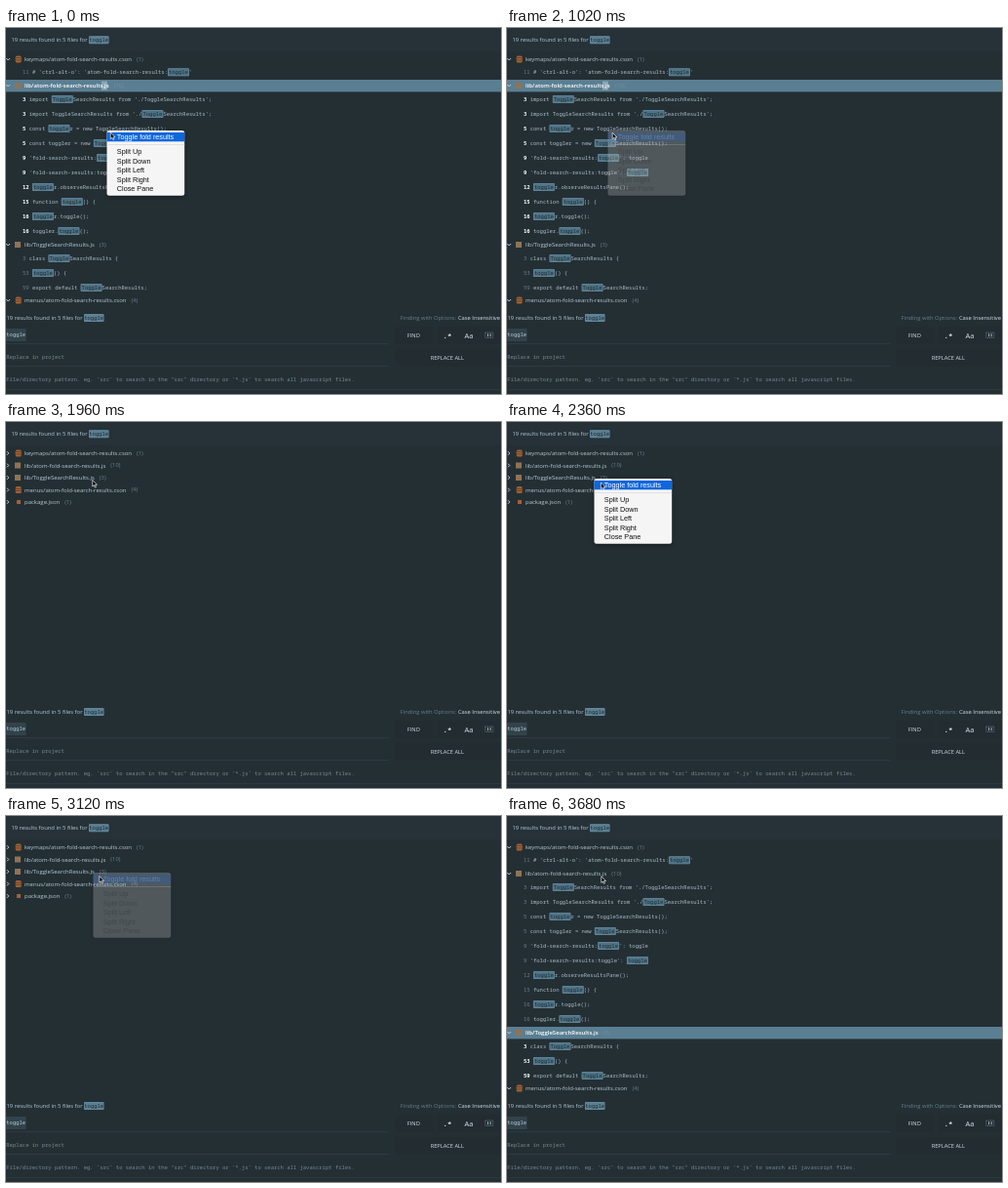
These frames come from a looping animation (508x375 px, 3.7 s). An HTML page with a canvas:

```html
<!DOCTYPE html>
<html lang="en">
<head>
<meta charset="utf-8">
<title>Fold search results</title>
<style>
  html, body { margin: 0; width: 100%; height: 100%; overflow: hidden; background: #242f34; }
  canvas { display: block; }
</style>
</head>
<body>
<canvas id="stage" width="508" height="375"></canvas>
<script>
const ctx = document.getElementById('stage').getContext('2d');
const LOOP = 3700;
const UI = '"Open Sans", sans-serif';
const MONO = '"Noto Sans Mono", monospace';
const MENU = '"Liberation Sans", sans-serif';
const C = {
  header: '#263238', list: '#242f34', button: '#222c31', line: '#2c3a41',
  name: '#b2cad6', code: '#a9bcc6', dim: '#66808c', hint: '#738a95', bright: '#d3e0e6',
  accent: '#5b7f92', mark: '#4f7385', markEdge: '#6b92a6', markText: '#1d2a30',
  orange: '#a8602f', tan: '#8f7355', blue: '#0f67dc'
};

// Square brackets enclose the highlighted match.
const files = [
  { name: 'keymaps/atom-fold-search-results.cson', count: 1, icon: 'stack', lines: [
    "11 # 'ctrl-alt-o': 'atom-fold-search-results:[toggle]'"] },
  { name: 'lib/atom-fold-search-results.js', count: 10, icon: 'square', lines: [
    "3 import [Toggle]SearchResults from './ToggleSearchResults';",
    "3 import ToggleSearchResults from './[Toggle]SearchResults';",
    '5 const [toggle]r = new ToggleSearchResults();',
    '5 const toggler = new [Toggle]SearchResults();',
    "9 'fold-search-results:[toggle]': toggle",
    "9 'fold-search-results:toggle': [toggle]",
    '12 [toggle]r.observeResultsPane();',
    '15 function [toggle]() {',
    '16 [toggle]r.toggle();',
    '16 toggler.[toggle]();'] },
  { name: 'lib/ToggleSearchResults.js', count: 3, icon: 'square', lines: [
    '3 class [Toggle]SearchResults {',
    '53 [toggle]() {',
    '59 export default [Toggle]SearchResults;'] },
  { name: 'menus/atom-fold-search-results.cson', count: 4, icon: 'stack', lines: [] },
  { name: 'package.json', count: 1, icon: 'dot', lines: [] }
];
const openY = [32, 59, 222, 279];
const menuItems = ['Split Up', 'Split Down', 'Split Left', 'Split Right', 'Close Pane'];

// Time, x, y of the pointer tip.
const pointerPath = [
  [0, 107.3, 107], [500, 107.3, 107], [700, 108.2, 107.2], [1480, 108.2, 107.2],
  [1880, 88.8, 59.5], [2140, 88.8, 59.5], [2340, 96.4, 62], [2960, 96.4, 62],
  [3240, 95.5, 61.3], [3420, 95.5, 61.3], [3600, 96.8, 61.8], [LOOP, 96.8, 61.8]
];
const menus = [
  { x: 103.5, y: 105, open: -1, hover: -1, blink: 740, fade: 880, close: 1060 },
  { x: 89.5, y: 58, open: 2060, hover: 2240, blink: 2840, fade: 2980, close: 3160 }
];
const FOLD_AT = 1140, UNFOLD_AT = 3500;

function rect(x, y, w, h, color) {
  ctx.fillStyle = color;
  ctx.fillRect(x, y, w, h);
}

function round(x, y, w, h, r, color) {
  ctx.beginPath();
  ctx.roundRect(x, y, w, h, r);
  ctx.fillStyle = color;
  ctx.fill();
}

function stroke(points, color, width = 1) {
  ctx.beginPath();
  points.forEach(([x, y]) => ctx.lineTo(x, y));
  ctx.strokeStyle = color;
  ctx.lineWidth = width;
  ctx.stroke();
}

// Draws text centred vertically on y and returns its right edge.
function text(str, x, y, size, family, color, style = '', align = 'left') {
  ctx.font = `${style} ${size}px ${family}`;
  ctx.textAlign = align;
  ctx.fillStyle = color;
  ctx.fillText(str, x, y + size * 0.34);
  return x + ctx.measureText(str).width;
}

const mono = (str, x, y, color, style) => text(str, x, y, 5.53, MONO, color, style);

function match(str, x, y) {
  round(x, y - 4, 22, 8, 1, C.markEdge);
  round(x + .5, y - 3.5, 21, 7, .7, C.mark);
  mono(str, x + 1, y, C.markText);
  return x + 22;
}

function badge(x, y) {
  round(x, y - 4, 20.5, 8, 1, C.markEdge);
  round(x + .5, y - 3.5, 19.5, 7, .7, C.accent);
  mono('toggle', x + .3, y, C.markText);
}

function codeLine(line, y, selected) {
  const gap = line.indexOf(' ');
  const number = line.slice(0, gap);
  mono(number, 17, y, selected ? '#fff' : C.dim, selected ? 'bold' : '');
  let x = 17 + (gap + 1) * 3.32;
  line.slice(gap + 1).split(/[[\]]/).forEach((part, i) => {
    x = i === 1 ? match(part, x, y) : mono(part, x, y, C.code);
  });
}

function icon(kind, y) {
  if (kind === 'stack') {
    round(9.7, y - 3.4, 6, 7, 1.6, C.orange);
    [-1.6, .7].forEach(dy => rect(9.7, y + dy, 6, .5, C.list));
  } else if (kind === 'square') {
    rect(9, y - 3, 6, 6, C.tan);
  } else {
    rect(11, y - 2, 4, 4, C.orange);
  }
}

function fileRow(file, y, open, selected, textSelected) {
  if (selected) rect(0, y - 6, 508, 12.4, C.accent);
  const arrow = open ? [[.3, y - 1], [2.2, y + 1], [4.1, y - 1]]
                     : [[1, y - 1.8], [2.8, y], [1, y + 1.8]];
  stroke(arrow, C.name);
  icon(file.icon, y);
  if (textSelected) rect(98, y - 4.5, 6, 9, '#8ba7b5');
  const end = text(file.name, 19, y, 6, UI, selected ? '#fff' : C.name, selected ? '600' : '500');
  text(`(${file.count})`, end + 5, y, 5.8, UI, selected ? '#6d8fa0' : C.dim);
}

function results(t) {
  rect(0, 24, 508, 262, C.list);
  if (t >= FOLD_AT && t < UNFOLD_AT) {
    files.forEach((file, i) => fileRow(file, 32 + i * 12.5, false));
    return;
  }
  const selected = t < FOLD_AT ? 1 : 2;
  openY.forEach((y, i) => {
    const first = [45.3, 73, 236, 0][i];
    fileRow(files[i], y, true, i === selected, i === 1 && selected === 1);
    files[i].lines.forEach((line, n) => codeLine(line, first + n * 15, i === selected));
  });
}

function summary(x, y) {
  text('19 results found in 5 files for', x, y, 5.88, UI, C.name, '500');
  badge(x + 79.5, y);
}

function findPanel() {
  rect(0, 286, 508, 89, C.list);
  summary(.5, 297);
  text('Finding with Options:', 462, 297, 5.8, UI, C.dim, '', 'right');
  text('Case Insensitive', 507, 297, 5.8, UI, C.bright, '500', 'right');

  rect(0, 308, 20.5, 13, '#33434b');
  mono('toggle', .3, 314.3, C.name);
  mono('Replace in project', .3, 337.3, C.hint);
  mono('File/directory pattern. eg. `src` to search in the "src" directory or `*.js` to search all javascript files.',
    .3, 360.3, C.hint);
  [323, 346, 370].forEach((y, i) => rect(0, y, i < 2 ? 393 : 508, 1, C.line));

  round(399, 306, 39, 18, 1, C.button);
  round(443, 306, 65, 18, 1, C.button);
  round(399, 329, 109, 18, 1, C.button);
  text('FIND', 418.3, 315, 5.7, UI, C.bright, '500', 'center');
  text('REPLACE ALL', 452.8, 338, 5.7, UI, C.bright, '500', 'center');
  text('.*', 453, 315, 7.5, MONO, C.bright, 'bold', 'center');
  text('Aa', 475, 315, 7.5, UI, C.bright, '', 'center');
  ctx.strokeStyle = C.hint;
  ctx.lineWidth = .7;
  ctx.setLineDash([1.3, .8]);
  ctx.strokeRect(491.8, 312, 8, 5.4);
  ctx.setLineDash([]);
  [494.2, 496.7].forEach(x => rect(x, 313.2, .9, 3, C.name));
}

function contextMenu(m, t) {
  if (t < m.open || t >= m.close) return;
  const blinkedOff = t >= m.blink && t < m.blink + 70;
  const active = t >= m.hover && !blinkedOff;
  ctx.save();
  ctx.globalAlpha = t < m.fade ? 1 : 1 - (t - m.fade) / (m.close - m.fade);
  ctx.shadowColor = 'rgba(0,0,0,.4)';
  ctx.shadowBlur = 4;
  ctx.shadowOffsetY = 1.5;
  round(m.x, m.y, 79.7, 66.7, 2.5, '#f5f5f5');
  ctx.shadowColor = 'transparent';
  if (active) rect(m.x, m.y + 2, 79.7, 9.3, C.blue);
  const x = m.x + 10.3;
  text('Toggle fold results', x, m.y + 6.5, 7.25, MENU, active ? '#fff' : '#111');
  rect(m.x, m.y + 14, 79.7, .8, '#dcdcdc');
  menuItems.forEach((item, i) => text(item, x, m.y + 22 + i * 9.5, 7.25, MENU, '#111'));
  ctx.restore();
}

function pointerAt(t) {
  const i = pointerPath.findIndex(p => p[0] > t);
  const [t0, x0, y0] = pointerPath[i - 1];
  const [t1, x1, y1] = pointerPath[i];
  const k = (t - t0) / (t1 - t0);
  const e = k * k * (3 - 2 * k);
  return [x0 + (x1 - x0) * e, y0 + (y1 - y0) * e];
}

function pointer(t) {
  const [x, y] = pointerAt(t);
  const shape = [[0, 0], [0, 6.6], [1.5, 5.2], [2.6, 7.6], [3.6, 7.1], [2.6, 4.8], [4.7, 4.8]];
  ctx.beginPath();
  shape.forEach(([dx, dy]) => ctx.lineTo(x + dx, y + dy));
  ctx.closePath();
  ctx.lineJoin = 'round';
  ctx.fillStyle = '#000';
  ctx.fill();
  ctx.lineWidth = .75;
  ctx.strokeStyle = '#e8e8e8';
  ctx.stroke();
}

function draw(now) {
  const t = now % LOOP;
  rect(0, 0, 508, 24, C.header);
  results(t);
  summary(5.5, 12.3);
  findPanel();
  menus.forEach(m => contextMenu(m, t));
  pointer(t);
}

let start;
function tick(now) {
  start ??= now;
  draw(Math.max(0, now - start));
  requestAnimationFrame(tick);
}
draw(0);
requestAnimationFrame(tick);
</script>
</body>
</html>
```
